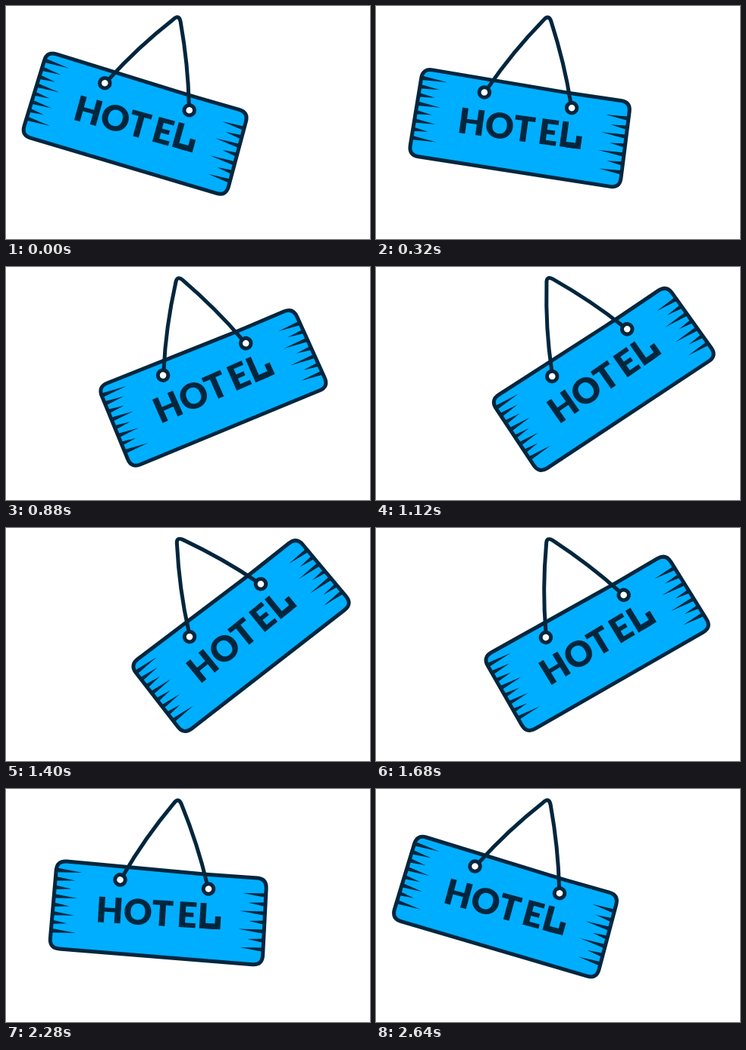
Animation, 480 px wide and 309 px high, one loop 2680 ms. Source, as an HTML page:

```html
<!DOCTYPE html>
<html lang="en">
<head>
<meta charset="utf-8">
<title>Swinging hotel sign</title>
<style>
  html, body { margin: 0; width: 100%; height: 100%; overflow: hidden; background: #fff; }
  svg { display: block; width: 100%; height: 100%; }
  .line { fill: none; stroke: #00263d; stroke-width: 5; stroke-linecap: round; stroke-linejoin: round; }
  .ink { fill: #00263d; }
  text { font: 900 46.5px Lato, sans-serif; text-anchor: middle; }
</style>
</head>
<body>
<svg viewBox="0 0 480 309">
  <g id="sign">
    <path id="board" class="line" style="fill:#00aeff"/>
    <path id="grain" class="ink"/>
    <g class="ink" transform="translate(-4 168) rotate(-2.7)">
      <text x="-69 -32 .5 33 59" y="0">HOTEL</text>
      <path d="M58 -3.7H74V-17" fill="none" stroke="#00263d" stroke-width="7.5"/>
    </g>
    <g class="line" style="fill:#fff">
      <circle cx="-64.5" cy="113" r="6.8"/>
      <circle cx="52.6" cy="112.5" r="6.8"/>
    </g>
    <path class="line" d="M-61 106.5Q-38.5 55 -5 4.5Q0 -4.5 5 4.5Q32.5 56 50 106"/>
  </g>
</svg>
<script>
  const LOOP = 2680, TURN = 1360;      // ms; the sign is furthest right at TURN
  const START = 18.15, SWING = 54.75;  // degrees
  const byId = id => document.getElementById(id);

  // Closed polygon with rounded corners
  function rounded(points, radius) {
    const toward = (p, q) => {
      const k = radius / Math.hypot(q[0] - p[0], q[1] - p[1]);
      return [p[0] + (q[0] - p[0]) * k, p[1] + (q[1] - p[1]) * k];
    };
    return points.map((p, i) => {
      const prev = points.at(i - 1), next = points[(i + 1) % points.length];
      return `${i ? 'L' : 'M'}${toward(p, prev)}Q${p} ${toward(p, next)}`;
    }).join('') + 'Z';
  }

  // Wood grain: thin wedges pointing inward from a side edge
  const wedges = (lengths, top, gap, edge, dir) => lengths.map((len, i) => {
    const y = top + gap * i, x = edge(y);
    return `M${x} ${y - 2.8}L${x + dir * len} ${y}L${x} ${y + 2.8}Z`;
  }).join('');

  byId('board').setAttribute('d',
    rounded([[-150, 96.5], [45, 93.7], [127.5, 90.7], [134, 205.5], [-147.5, 213]], 13));
  byId('grain').setAttribute('d',
    wedges([34, 26, 22, 31, 22, 29, 21, 34], 109, 11.5, () => -149, 1) +
    wedges([31, 23, 34, 21, 35, 22, 31], 113, 12, y => 128 + .057 * (y - 91), -1));

  const smooth = u => u * u * (3 - 2 * u);

  function draw(now) {
    const t = now % LOOP;
    const swing = t < TURN ? smooth(t / TURN) : 1 - smooth((t - TURN) / (LOOP - TURN));
    byId('sign').setAttribute('transform', `translate(226.8 15) rotate(${START - SWING * swing})`);
    requestAnimationFrame(() => draw(performance.now() - begin));
  }
  const begin = performance.now();
  draw(0);
</script>
</body>
</html>
```
